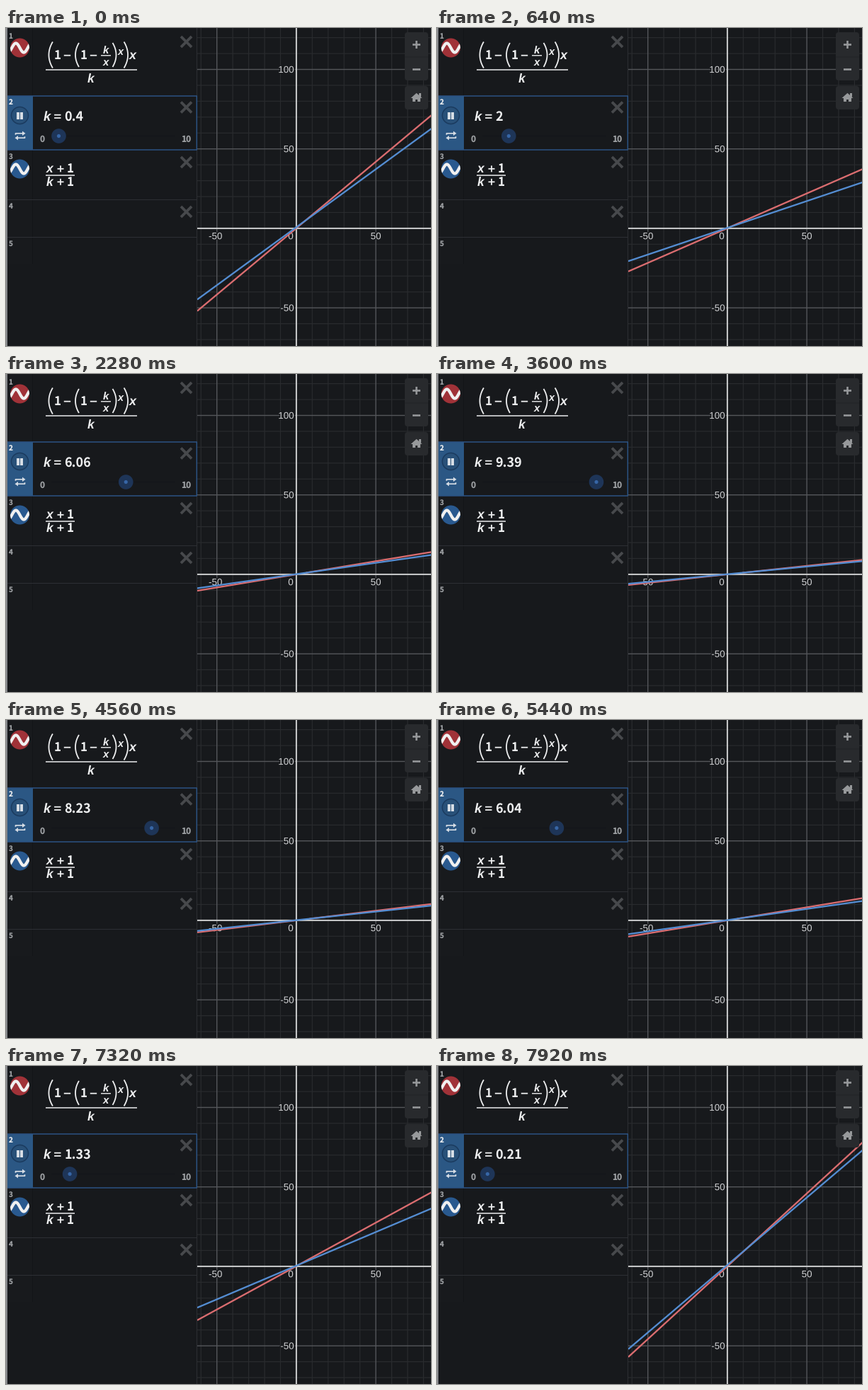
A matplotlib script that plays this animation: 600x449 px, repeating every 7960 ms.

```python
import matplotlib.pyplot as plt
import numpy as np
from matplotlib.animation import FuncAnimation
from matplotlib.patches import Circle, FancyBboxPatch, Polygon, Rectangle
from matplotlib.patheffects import withStroke

W, H, DPI = 600, 449, 64
STEP, FRAMES = 40, 199
LAG = 12  # the curves trail the slider slightly, in ms
PT = 72 / DPI  # points per pixel

BG, INK, DIM = "#17191c", "#eeeff0", "#9da0a3"
RED, BLUE, FOCUS = "#db6d70", "#548dd2", "#2b5384"
PANEL = 270
OX, OY, UNIT = 409.9, 282.9, 2.244  # origin and pixels per unit

plt.rcParams["text.hinting"] = "none"
fig = plt.figure(figsize=(W / DPI, H / DPI), dpi=DPI, facecolor=BG)
ax = fig.add_axes([0, 0, 1, 1])
ax.set(xlim=(0, W), ylim=(H, 0))
ax.axis("off")


def line(xs, ys, color, lw=1.0, z=1, cap="butt"):
    return ax.plot(xs, ys, color=color, lw=lw * PT, zorder=z, snap=False,
                   solid_capstyle=cap, solid_joinstyle="round")[0]


def rect(x0, y0, x1, y1, color, z=5):
    ax.add_patch(Rectangle((x0, y0), x1 - x0, y1 - y0, fc=color, lw=0, zorder=z))


def disc(x, y, r, color, z=7, edge="none", lw=0):
    return ax.add_patch(Circle((x, y), r, fc=color, ec=edge, lw=lw * PT, zorder=z))


def poly(points, color, z=8):
    ax.add_patch(Polygon(points, fc=color, lw=0, zorder=z))


def text(x, y, s, size, color=INK, font="Noto Sans CJK JP", z=8, **kw):
    return ax.text(x, y, s, size=size * PT, color=color, family=font, zorder=z, **kw)


def num(x, y, s, size=18, **kw):
    return text(x, y, s, size, weight="bold", **kw)


def var(x, y, s, size=18):
    text(x, y, s, size, font="Liberation Sans", weight="bold", style="italic", ha="center")


def minus(x, y, half=4.7):
    line([x - half, x + half], [y, y], INK, 1.8, 8)


def plus(x, y, half=4.5):
    minus(x, y, half)
    line([x, x], [y - half, y + half], INK, 1.8, 8)


def paren(x, y, w, h, side):
    t = np.linspace(-1, 1, 30)
    line(x + side * w * (0.5 - t ** 2), y + h * t, INK, 1.8, 8)


# --- graph -------------------------------------------------------------
def draw_grid():
    for i in range(-12, 13):
        color, lw, z = ("#54565a", 1.4, 1.5) if i % 5 == 0 else ("#292b2e", 1.2, 1)
        if i == 0:
            color, lw, z = "#cccdce", 2, 2
        p = i * 10 * UNIT
        if PANEL < OX + p < W:
            line([OX + p] * 2, [0, H], color, lw, z)
        if 0 < OY + p < H:
            line([PANEL, W], [OY + p] * 2, color, lw, z)

    def label(x, y, s, ha):
        text(x, y, s, 13.4, "#d2d3d5", "Liberation Sans", 3, ha=ha,
             path_effects=[withStroke(linewidth=3 * PT, foreground=BG)])

    for v in (-50, 50):
        label(OX + v * UNIT - (2 if v < 0 else 0), 298.2, str(v), "center")
    label(405.7, 298.2, "0", "right")
    for v in (-50, 50, 100):
        label(406.6, OY - v * UNIT + 4.6, str(v), "right")


def button(y0, y1):
    ax.add_patch(FancyBboxPatch((566, y0 + 3), 27, y1 - y0 - 6, lw=0, fc="#282a2d",
                                boxstyle="round,pad=3,rounding_size=4", zorder=6))


def draw_buttons():
    grey = "#97999b"
    button(6, 74)
    button(82, 115)
    line([563, 596], [41, 41], "#222427", 1, 7)
    line([574, 585], [23.5, 23.5], grey, 2.6, 7)
    line([579.5, 579.5], [18, 29], grey, 2.6, 7)
    line([574, 585], [58.5, 58.5], grey, 2.6, 7)
    rect(583.2, 92, 585.5, 97, grey, 7)
    poly([(571.5, 99), (579.5, 91.8), (587.5, 99)], grey, 7)
    poly([(574, 98.5), (585, 98.5), (585, 104), (581, 104),
          (581, 100.5), (578, 100.5), (578, 104), (574, 104)], grey, 7)


# --- expression list ---------------------------------------------------
def curve_icon(y, color):
    base = disc(19.5, y, 13.5, color)
    x = np.linspace(5, 34, 80)
    wave = line(x, y - 6.5 * np.sin((x - 8.3) * np.pi / 11.2), "#f0f0f0", 4.2, 8)
    wave.set_clip_path(base)


def draw_gutter():
    rect(0, 0, PANEL, H, BG, 4)
    rect(2, 0, 37, 333, "#181a1d")
    line([37.5, 37.5], [0, 333], "#121417", 1, 5.5)
    rect(2, 96, 37.5, 172, "#2b5784", 6)
    for y in (242.5, 295.5):
        line([2, PANEL], [y, y], "#2d2f34", 1, 6)
    line([269.5, 269.5], [0, H], "#2c2e32", 1, 6)
    line([2, 269.3, 269.3, 2], [96, 96, 172, 172], FOCUS, 1.5, 6.5)
    rect(0, 0, 2, H, "#85878a", 7)
    for i, y in enumerate((14.6, 108.3, 185.3, 254.8, 307.8)):
        num(3.5, y, str(i + 1), 10, color=INK if i == 1 else DIM)
    for y in (19.5, 112, 189.5, 259.5):
        for d in (-7.5, 7.5):
            line([247, 262], [y - d, y + d], "#47494c", 3.8, 7)
    curve_icon(28, "#a03238")
    curve_icon(199, "#29598f")

    pale = "#d6dde5"
    disc(19.5, 123.5, 12, "#295179", edge="#1a3a5e", lw=1.5)
    rect(14.8, 118.5, 18.6, 128.7, pale, 8)
    rect(20.4, 118.5, 24.2, 128.7, pale, 8)
    for s in (1, -1):
        y = 152 - s * 3.2
        line([20 - s * 6.5, 20 - s * 6.5, 20 + s * 4], [y + s * 2, y, y], pale, 1.7, 8)
        poly([(20 + s * 3, y - 3.2), (20 + s * 7.5, y), (20 + s * 3, y + 3.2)], pale)


def draw_formulas():
    paren(63.2, 38, 5.5, 18.5, -1)
    num(67.5, 44.5, "1", 17)
    minus(86.5, 38.7)
    paren(100.5, 38, 5, 17, -1)
    num(105, 44.5, "1", 17)
    minus(123.5, 38.7)
    var(141, 36, "k", 15)
    line([134, 148], [38.8, 38.8], INK, 1.4, 8)
    var(141, 53, "x", 15)
    paren(153, 38, 5, 17, 1)
    var(161.5, 38.5, "x", 14.5)
    paren(169.3, 38, 5.5, 18.5, 1)
    var(179, 44.5, "x", 18)
    line([56, 185], [59, 59], INK, 1.5, 8)
    var(120, 77, "k", 17.5)

    var(58, 131, "k", 18.5)
    for y in (122.7, 127):
        minus(72.8, y)
    text(51.5, 160.8, "0", 12, DIM, weight="bold", ha="center")
    text(254, 160.8, "10", 12, DIM, weight="bold", ha="center")
    line([66, 237], [152.5, 152.5], "#15171b", 3, 6, "round")

    for name, y in (("x", 204.3), ("k", 222.8)):
        var(62, y, name, 17.5)
        plus(77, y - 5.5)
        num(86, y, "1", 17)
    line([56, 97], [208, 208], INK, 1.5, 8)


# --- motion ------------------------------------------------------------
def k_at(ms):
    """Slider value: steady sweep up to 10, back down to 0, then up again."""
    times = (-40, 0, 1360, 2280, 3600, 3850, 5440, 6640, 7846, 7920)
    values = (0.3, 0.4, 3.8, 6.06, 9.39, 10, 6.04, 3.04, 0.01, 0.21)
    return np.interp(ms, times, values)


def red_curve(x, k):
    base = 1 - k / x
    ok = base > 0
    y = np.full_like(x, np.nan)
    y[ok] = (1 - base[ok] ** x[ok]) * x[ok] / k
    return y


draw_grid()
draw_buttons()
draw_gutter()
draw_formulas()

xs = np.linspace((PANEL - OX) / UNIT, (W + 2 - OX) / UNIT, 1000)
px = OX + xs * UNIT
red = line(px, px, RED, 2.3, 3.5)
blue = line(px, px, BLUE, 2.3, 3.6)
value = num(82.5, 131, "", 18)
knob = disc(0, 152.5, 10.3, "#1e3558")
dot = disc(0, 152.5, 2.6, "#3766a6", 8)


def update(i):
    k, drawn = k_at(i * STEP), k_at(i * STEP - LAG)
    red.set_ydata(OY - UNIT * red_curve(xs, drawn))
    blue.set_ydata(OY - UNIT * (xs + 1) / (drawn + 1))
    value.set_text(f"{round(k, 2):g}")
    for c in (knob, dot):
        c.center = (67.8 + 16.74 * k, 152.5)
    return red, blue, value, knob, dot


anim = FuncAnimation(fig, update, frames=FRAMES, interval=STEP, repeat=True, repeat_delay=0)
plt.show()
```
